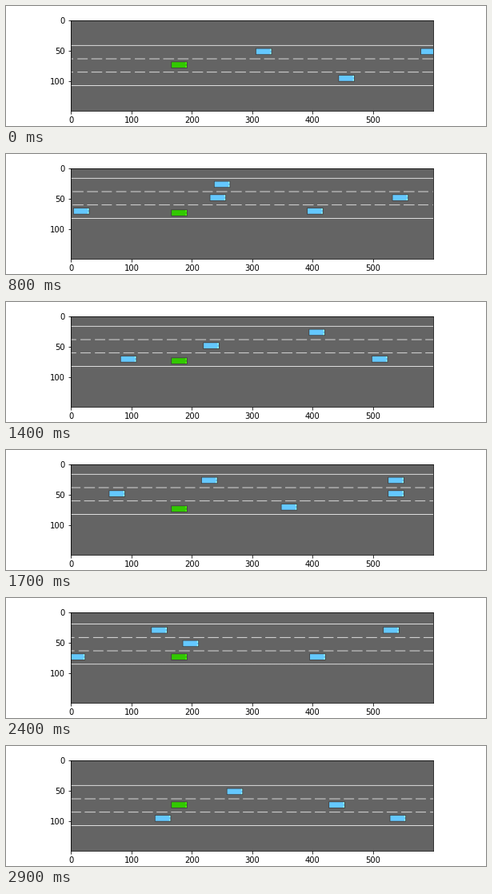
Write a matplotlib script that moves like this. It is 600x150 px and loops after 3 s.

```python
import math

import numpy as np
import matplotlib.pyplot as plt
from matplotlib.animation import FuncAnimation

W, H, DPI = 600, 150, 72
FRAMES, INTERVAL = 30, 100
LANE = 22                      # lane width in road pixels
STRIPE, PERIOD = 16.5, 23.815  # dash length and spacing
CAR_L, CAR_W = 27, 11
EGO_X, EGO_Y = 180, 75         # centre of the green car
OVERSHOOT = 3                  # rows past the lane centre after a change

ASPHALT = (100, 100, 100)
WHITE = (255, 255, 255)
OUTLINE = (60, 60, 60)
GREEN = (50, 200, 0)
BLUE = (100, 200, 255)

# The green car keeps to lane 1 apart from these trips: lane -> (first, last) step
TRIPS = {
    0: [(4, 4), (19, 19)],
    2: [(8, 9), (11, 11), (14, 15), (17, 17), (23, 26)],
}

# Traffic by lane: step at which the green car draws level, speed in px per step
TRAFFIC = {
    0: [(3.1, 57.2), (9.48, 47.5), (17.84, 59.2), (23.4, 56), (30.76, 51.9)],
    1: [(9.08, 58.9), (15.01, 52.2), (24.39, 48.5), (34.1, 51)],
    2: [(5.28, 59.6), (12.36, 51.5), (20.62, 50.1), (28.46, 51.3), (36.08, 51)],
}


def ego_lane(n):
    for lane, spans in TRIPS.items():
        if any(a <= n <= b for a, b in spans):
            return lane
    return 1


def road_top(n):
    """Row of the upper road edge; each lane change first overshoots."""
    lane = ego_lane(n)
    turn = lane - ego_lane(max(n - 1, 0))
    return EGO_Y - LANE // 2 - LANE * lane - OVERSHOOT * turn


def car_x(level, speed, n):
    """Constant closing speed, less what is lost while the green car speeds up."""
    return EGO_X + speed * (level - n) - 38 * math.exp(-n / 1.4)


def fill(img, x, y, w, h, color):
    img[max(y, 0):max(y + h, 0), max(x, 0):max(x + w, 0)] = color


def draw_car(img, cx, cy, color):
    x, y = round(cx - CAR_L / 2), cy - 6
    light = [min(int(c / 0.68), 255) for c in color]
    fill(img, x, y, CAR_L, CAR_W, OUTLINE)
    fill(img, x + 1, y + 1, CAR_L - 2, CAR_W - 2, color)
    for dy in (1, 7):
        fill(img, x + CAR_L - 3, y + dy, 2, 3, light)


def draw_road(img, top, n):
    for edge in (0, 3):
        fill(img, 0, top + edge * LANE, W, 1, WHITE)
    phase = (11 + 2.08 * n) % PERIOD
    for x in np.arange(phase - PERIOD, W, PERIOD):
        a, b = math.floor(x), math.floor(x + STRIPE)
        for k in (1, 2):
            fill(img, a, top + k * LANE, b - a + 1, 1, WHITE)


def scene(n):
    img = np.full((H, W, 3), ASPHALT, np.uint8)
    top = road_top(n)
    draw_road(img, top, n)
    for lane, cars in TRAFFIC.items():
        for level, speed in cars:
            draw_car(img, car_x(level, speed, n),
                     top + LANE // 2 + LANE * lane, BLUE)
    draw_car(img, EGO_X, EGO_Y, GREEN)
    return img


plt.rcParams["font.family"] = "DejaVu Sans"
plt.rcParams["font.size"] = 10
fig = plt.figure(figsize=(W / DPI, H / DPI), dpi=DPI, facecolor="white")
fig.subplots_adjust(left=0.125, right=0.9, bottom=0.125, top=0.88)
ax = fig.add_subplot()
view = ax.imshow(scene(0))
ax.set_xticks(range(0, W, 100))
ax.set_yticks(range(0, H, 50))


def update(n):
    view.set_data(scene(n))
    return [view]


anim = FuncAnimation(fig, update, frames=FRAMES, interval=INTERVAL,
                     repeat=True, repeat_delay=0)
plt.show()
```
